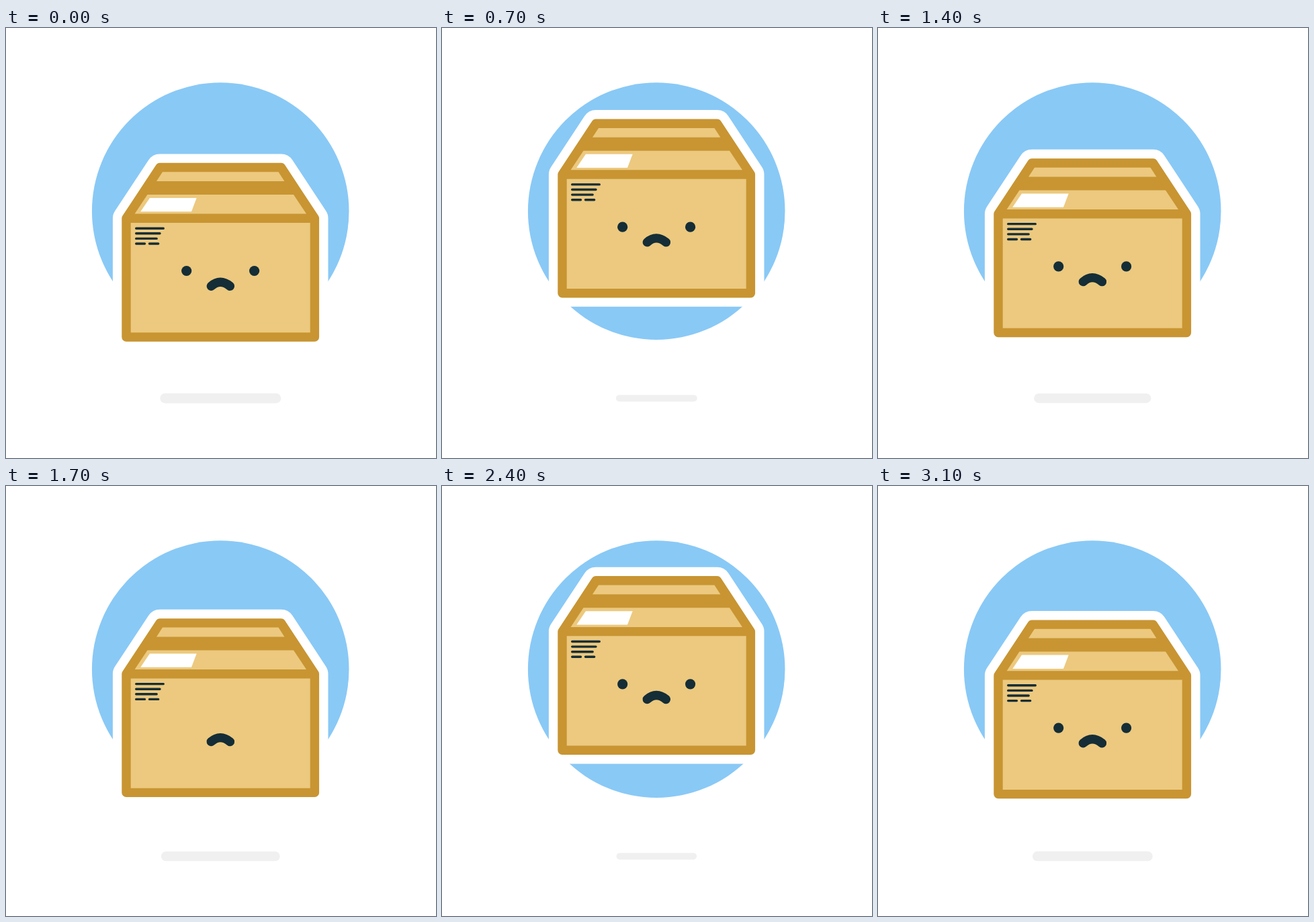
Animation of 640x640 px, one loop 3200 ms. Source, as an HTML page:

```html
<!DOCTYPE html>
<html lang="en">
<head>
<meta charset="utf-8">
<title>Hovering box</title>
<style>
  html, body { margin: 0; width: 100%; height: 100%; overflow: hidden; background: #fff; }
  svg { display: block; width: 100%; height: 100%; }
  .ink { fill: none; stroke: #152d36; stroke-linecap: round; }
</style>
</head>
<body>
<svg viewBox="0 0 640 640">
  <circle cx="319.2" cy="272.6" r="191.3" fill="#89c9f6"/>
  <rect id="shadow" x="-90.25" y="-7.3" width="180.5" height="14.6" rx="7.2" fill="#f0f0f0"/>
  <g id="box">
    <g stroke-linejoin="round">
      <path d="M179 283.3L229 207.5H409.5L459.4 283.3V460H179Z" fill="#fff" stroke="#fff" stroke-width="40.2"/>
      <path d="M179 283.3L229 207.5H409.5L459.4 283.3V460H179Z" fill="#c89532" stroke="#c89532" stroke-width="13.4"/>
    </g>
    <g fill="#ecc97f">
      <path d="M233 214.2H405.5L414.4 228H224Z"/>
      <path d="M210.5 248H428L447 276.6H191.6Z"/>
      <path d="M185.7 290H452.7V453.3H185.7Z"/>
    </g>
    <path d="M214 253H283.7L276 273.3H200.3Z" fill="#fff"/>
    <path class="ink" stroke-width="3.4" d="M193.7 298.2H234.3M193.7 305.8H229M193.7 313.4H224.2M193.7 321H206.5M213.5 321H226.7"/>
    <g fill="#152d36">
      <ellipse class="eye" cx="268.7" cy="361.5" rx="7.6"/>
      <ellipse class="eye" cx="369.6" cy="361.5" rx="7.6"/>
    </g>
    <path class="ink" stroke-width="13.4" d="M305.3 384.2Q318.8 372.2 333.4 384.2"/>
  </g>
</svg>
<script>
  const LOOP = 3200, HALF = 800, LIFT = 67.7;
  const STEP = 100, TICK = 40;
  const BLINK = 1720, BLINK_HALF = 120;
  const box = document.getElementById('box');
  const shadow = document.getElementById('shadow');
  const eyes = document.querySelectorAll('.eye');

  const smooth = x => x * x * (3 - 2 * x);

  // 0 at the bottom of the hover, 1 at the top
  function hover(t) {
    const u = (t / HALF) % 2;
    return smooth(u < 1 ? u : 2 - u);
  }

  function render(t) {
    const p = hover(t);
    const open = smooth(Math.min(1, Math.abs(t - BLINK) / BLINK_HALF));
    box.setAttribute('transform', `translate(0 ${0.49 - LIFT * p})`);
    shadow.setAttribute('transform', `translate(319.3 551.1) scale(${1 - 0.34 * p})`);
    eyes.forEach(e => e.setAttribute('ry', 7.6 * open));
  }

  // Poses hold for one step and are sampled on the next 25 fps tick
  function poseTime(ms) {
    const held = Math.floor((ms + 1) / STEP) * STEP % LOOP;
    return (Math.floor(held / TICK) + 1) * TICK;
  }

  const start = performance.now();
  function loop() {
    render(poseTime(performance.now() - start));
    requestAnimationFrame(loop);
  }
  loop();
</script>
</body>
</html>
```
